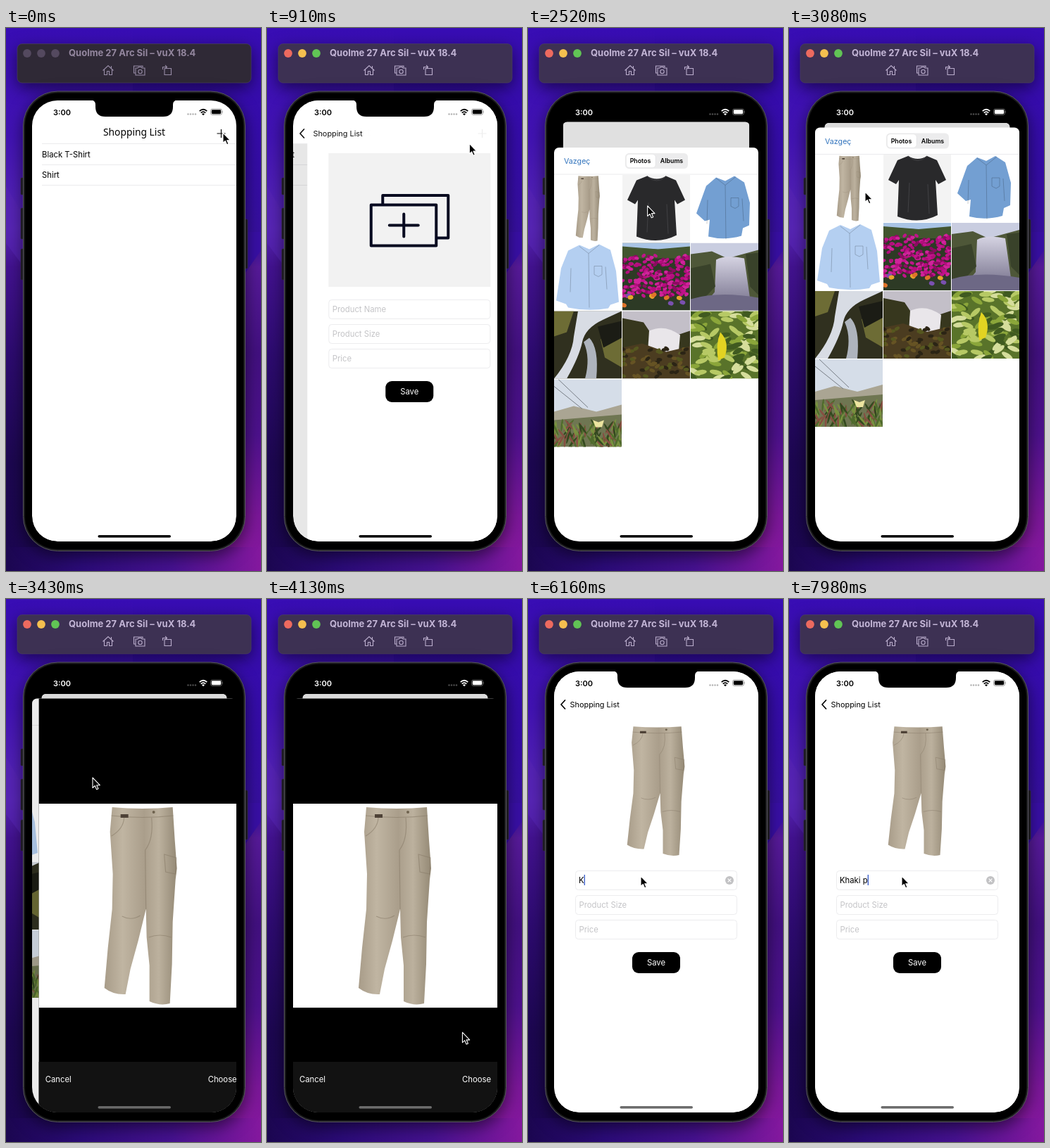
Recreate the animation shown at these times as an HTML page. Size 362x772 px, loop 8 s.

```html
<!DOCTYPE html>
<html lang="en">
<head>
<meta charset="utf-8">
<title>Shopping list app</title>
<style>
  html, body { margin: 0; width: 100%; height: 100%; overflow: hidden; background: #2a0a80; }
  svg { display: block; width: 362px; height: 772px; font: 11.3px Inter, sans-serif; }
  text { white-space: pre; }
  .shadow { filter: drop-shadow(0 7px 11px #0008); }
  .hint { fill: #c4c4c7; }
  .field { fill: #fff; stroke: #ececee; }
  .line { stroke: #ebebed; }
  .icon { fill: none; stroke: #b9accb; stroke-width: 1.1; }
</style>
</head>
<body>
<svg viewBox="0 0 362 772">
  <defs>
    <linearGradient id="wallLeft" x2="0" y2="1">
      <stop stop-color="#380db4"/><stop offset=".2" stop-color="#4113b2"/>
      <stop offset=".37" stop-color="#5726b4"/><stop offset=".44" stop-color="#42128f"/>
      <stop offset=".6" stop-color="#2d0b70"/><stop offset=".8" stop-color="#1c0750"/>
      <stop offset="1" stop-color="#1b0650"/>
    </linearGradient>
    <linearGradient id="wallRight" x2="0" y2="1">
      <stop stop-color="#380db4"/><stop offset=".25" stop-color="#340ca5"/>
      <stop offset=".4" stop-color="#36109c"/><stop offset=".44" stop-color="#561a98"/>
      <stop offset=".6" stop-color="#421080"/><stop offset=".75" stop-color="#4d118c"/>
      <stop offset=".9" stop-color="#7b1798"/><stop offset="1" stop-color="#87189f"/>
    </linearGradient>
    <linearGradient id="wallBottom">
      <stop stop-color="#1b0650"/><stop offset=".3" stop-color="#2b0b78"/>
      <stop offset=".65" stop-color="#45118f"/><stop offset="1" stop-color="#84189e"/>
    </linearGradient>
    <linearGradient id="khaki">
      <stop stop-color="#a89c89"/><stop offset=".25" stop-color="#c0b5a2"/>
      <stop offset=".55" stop-color="#aa9e8b"/><stop offset=".75" stop-color="#bcb19e"/><stop offset="1" stop-color="#948975"/>
    </linearGradient>
    <linearGradient id="mist" x2="0" y2="1">
      <stop stop-color="#d5d3e2"/><stop offset="1" stop-color="#6f6a85"/>
    </linearGradient>
    <clipPath id="screenClip"><rect x="37" y="103" width="290" height="627" rx="36"/></clipPath>
    <clipPath id="pageArea"><path d="M37 103H327V694A36 36 0 0 1 291 730H73A36 36 0 0 1 37 694Z"/></clipPath>
    <clipPath id="pageClip"><rect id="pageShape" x="37" y="103" width="290" height="627"/></clipPath>
    <clipPath id="cellClip"><rect width="96" height="96"/></clipPath>

    <g id="pants">
      <path fill="url(#khaki)" d="M104 5 101 40 105 100 104 150 98 205 93 262Q106 272 123 271L130 235 141 195 152 150 153 190 157 230 157 281Q172 288 186 284L189 228 190 168 194 108 196 92 193 52 190 5Q147 9 104 5Z"/>
      <path fill="none" stroke="#85796688" stroke-width="1.2" d="M103 17Q147 22 191 17M160 20Q163 50 151 66L152 150M121 20Q120 36 103 46M178 72 195 77 194 100 180 97ZM118 160Q131 167 144 159M156 190Q172 184 188 190"/>
      <path fill="#4e4237" d="M116 15h11v5h-11z"/><circle cx="163" cy="12" r="2" fill="#6e624e"/>
    </g>
    <path id="shirtSeams" fill="none" stroke="#0003" d="M36 5 49 15 64 3M49 15 50 92M23 70 24 36M75 66 73 34M57 33h11v12l-5 3-6-3z"/>
  </defs>

  <rect width="362" height="772" fill="url(#wallLeft)"/>
  <rect x="180" width="182" height="772" fill="url(#wallRight)"/>
  <path fill="#5726b4" d="M0 225 24 265V338L0 306Z" opacity=".6"/>
  <path fill="#380fa4" d="M340 290h22v26l-22 32z"/>
  <rect y="738" width="362" height="34" fill="url(#wallBottom)"/>

  <g class="shadow">
    <rect id="bar" x="16" y="22.5" width="332" height="55.5" rx="7" stroke="#50455f" stroke-width=".6"/>
    <circle class="light" cx="30" cy="36" r="5.900"/>
    <circle class="light" cx="50" cy="36" r="5.900"/>
    <circle class="light" cx="70" cy="36" r="5.900"/>
    <text id="windowTitle" x="89" y="40" font-size="13" font-weight="700">Quolme 27 Arc Sil – vuX 18.4</text>
    <g id="tools" class="icon">
      <path d="M137.500 60.500 145 53.500 152.500 60.500M139.500 59V66.500H143.500V61.500H146.500V66.500H150.500V59M149.500 57V54"/>
      <path d="M184 64H181.500V54H194V56M184 57H187L188 55.500H192L193 57H197V67H184Z"/><circle cx="190.500" cy="62" r="2.700"/>
      <path d="M225 57.500H234.500V66.500H225ZM222.500 59V55.500H228M226 53 228.500 55.500 226 58"/>
    </g>
  </g>

  <g fill="#25222c" stroke="#3d3948" stroke-width=".6">
    <rect x="21" y="213" width="6" height="24" rx="1.500"/><rect x="21" y="256" width="6" height="44" rx="1.500"/>
    <rect x="21" y="314" width="6" height="44" rx="1.500"/><rect x="337" y="272" width="6" height="70" rx="1.500"/>
  </g>
  <rect class="shadow" x="24.500" y="90" width="315" height="653.500" rx="49" fill="#1b1b1d" stroke="#58575d"/>
  <rect x="27" y="92.500" width="310" height="648.500" rx="46.500"/>

  <g clip-path="url(#pageArea)">
    <g id="page"><g clip-path="url(#pageClip)">
      <rect x="37" y="103" width="290" height="627" fill="#fff"/>
      <g id="list">
        <path class="line" d="M51 164.500H327M51 194.500H327M51 223.500H327"/>
        <text x="51" y="184">Black T-Shirt</text>
        <text x="51" y="213">Shirt</text>
      </g>
      <rect id="listDim" x="37" y="165" width="290" height="565"/>
      <g id="detail">
        <rect x="37" y="103" width="290" height="627" fill="#fff"/>
        <g id="picker">
          <rect x="67" y="178" width="230" height="190" fill="#f2f2f2"/>
          <path fill="none" stroke="#070a20" stroke-width="4" stroke-linejoin="round" stroke-linecap="round" d="M144 250V238H237V298.500H221M127.500 251.500H220V309.500H127.500ZM153.500 280.500H194.500M174 264.500V296.500"/>
        </g>
        <use id="chosen" href="#pants" transform="translate(67 178) scale(.793 .655)"/>
        <rect class="field" x="67.500" y="386.500" width="229" height="27" rx="4"/>
        <rect class="field" x="67.500" y="421.500" width="229" height="27" rx="4"/>
        <rect class="field" x="67.500" y="456.500" width="229" height="27" rx="4"/>
        <text id="nameHint" class="hint" x="72.500" y="404">Product Name</text>
        <text class="hint" x="72.500" y="439">Product Size</text>
        <text class="hint" x="72.500" y="474">Price</text>
        <text id="typed" x="72" y="404"></text>
        <rect id="caret" y="392" width="1.300" height="15" fill="#3056c8"/>
        <g id="clear"><circle cx="286" cy="400" r="6" fill="#c2c2c4"/><path stroke="#fff" stroke-width="1.200" d="M283.700 397.700l4.600 4.600m0-4.600l-4.600 4.600"/></g>
        <rect x="148" y="502" width="68" height="30" rx="9"/>
        <text x="182" y="521" fill="#fff" text-anchor="middle">Save</text>
      </g>
      <g id="title">
        <text x="182" y="153" text-anchor="middle" style="font:500 13.800px 'Noto Sans',sans-serif">Shopping List</text>
      </g>
      <path id="plus" stroke="#000" stroke-width="1.200" d="M299.500 150H311.500M305.500 144V156"/>
      <g id="back"><text x="59.500" y="154" font-size="10.900">Shopping List</text></g>
      <path id="chevron" fill="none" stroke="#000" stroke-width="1.700" stroke-linecap="round" stroke-linejoin="round" d="M52.500 144 47 150 52.500 156"/>
      <rect id="pageDim" x="37" y="103" width="290" height="627"/>
    </g></g>
  </g>

  <g clip-path="url(#screenClip)">
    <g id="sheet">
      <rect x="37" y="141.500" width="290" height="620" rx="7" fill="#fff"/>
      <g id="library">
        <text x="51" y="164.500" font-size="10.700" fill="#3274bd">Vazgeç</text>
        <rect x="138" y="149.500" width="89" height="22" rx="5.500" fill="#ececed"/>
        <rect x="139.200" y="150.700" width="42" height="19.600" rx="4.800" fill="#fff" stroke="#dededf" stroke-width=".6"/>
        <g font-size="8.800" font-weight="600" text-anchor="middle"><text x="159.500" y="163.700">Photos</text><text x="204" y="163.700">Albums</text></g>
        <path class="line" d="M37 179.500H327"/>
        <g id="grid"></g>
      </g>
      <rect id="libraryDim" x="37" y="141.500" width="290" height="620" rx="7"/>
      <g id="preview">
        <rect x="37" y="141.500" width="290" height="620" rx="1"/>
        <rect x="37" y="291" width="290" height="290" fill="#fff"/>
        <use href="#pants" x="37" y="291"/>
        <rect x="37" y="658" width="290" height="100" fill="#121212"/>
        <g fill="#fff"><text x="46" y="686.500">Cancel</text><text x="277" y="686.500">Choose</text></g>
      </g>
    </g>

    <g id="status">
      <text x="67" y="123.500" font-size="11" font-weight="600">3:00</text>
      <g opacity=".3"><circle cx="258.500" cy="122.500" r="1.200"/><circle cx="262" cy="122.500" r="1.200"/><circle cx="265.500" cy="122.500" r="1.200"/><circle cx="269" cy="122.500" r="1.200"/></g>
      <path fill="none" stroke="currentColor" stroke-width="1.700" d="M274.700 118.200Q280 113.300 285.300 118.200M276.700 120.600Q280 117.600 283.300 120.600"/>
      <path d="M278 122.200Q280 120.500 282 122.200L280 124.200Z"/>
      <rect x="290.500" y="115" width="16" height="8.500" rx="2.500" fill="none" stroke="currentColor" stroke-width=".7" opacity=".5"/>
      <rect x="291.800" y="116.300" width="13.400" height="5.900" rx="1.400"/><path d="M307.500 117.700q1.400 1.500 0 3z" opacity=".5"/>
    </g>
    <rect id="home" x="130.500" y="721" width="103.500" height="3.400" rx="1.700"/>
  </g>
  <path d="M121 102.500Q127 103 127 109V112Q127 126 141 126H223Q237 126 237 112V109Q237 103 243 102.500Z"/>

  <path id="cursor" stroke="#fff" stroke-width="1.100" stroke-linejoin="round" d="M0 0V14.500L3.300 11.500 5.600 16.800 8 15.800 5.700 10.700H10.300Z"/>
</svg>
<script>
const LOOP = 8000;
const el = Object.fromEntries([...document.querySelectorAll('[id]')].map(n => [n.id, n]));
const lights = [...document.querySelectorAll('.light')];
const lightColors = ['#ed6a5f', '#f5bf4f', '#61c455'];

let seed = 7;
const random = () => (seed = seed * 16807 % 2147483647) / 2147483647;
const shape = (fill, d) => `<path fill="${fill}" d="${d}"/>`;
const backdrop = fill => shape(fill, 'M0 0H96V96H0Z');

// Random blobs between two heights, in colours taken in turn
function scatter(count, top, bottom, rx, ry, colors) {
  let out = '';
  for (let i = 0; i < count; i++) {
    const x = random() * 96, y = top + random() * (bottom - top), turn = random() * 90 - 45;
    out += `<ellipse rx="${rx}" ry="${ry}" fill="${colors[i % colors.length]}" transform="translate(${x.toFixed(1)} ${y.toFixed(1)}) rotate(${turn.toFixed()})"/>`;
  }
  return out;
}

const seams = '<use href="#shirtSeams"/>';
const photos = [
  '<use href="#pants" transform="scale(.331)"/>',
  backdrop('#f3f3f3') + shape('#29292b', 'M35 2Q49 10 62 2L76 8 89 36 78 42 74 36 77 86Q50 100 20 88L22 36 18 42 7 36 20 8Z') +
    '<path fill="none" stroke="#414144" d="M35 2Q49 15 62 2M37 40 35 82M63 42 65 84"/>',
  shape('#739fd2', 'M36 4 49 9 62 2 76 11 84 40 83 72 74 76 72 87Q48 94 25 88L27 64 20 66 8 55 22 16Z') + seams,
  shape('#b4cff1', 'M36 3 50 9 64 2 80 10 88 40 92 84 80 88 77 93Q48 98 20 92L17 87 3 82 10 36 20 11Z') + seams,
  backdrop('#2d3a25') + shape('#a9c4e4', 'M0 0H96V7L60 10 0 6Z') + shape('#42552f', 'M0 5 50 9 96 5V22H0Z') +
    scatter(230, 18, 76, 3.2, 2.2, ['#b40d7d', '#d0249b', '#8d0a62', '#c0148a']) + scatter(9, 74, 90, 4, 3, ['#e7a32c', '#e0742a', '#7a50b0']),
  backdrop('#c9cde0') + shape('#4e5738', 'M0 16 30 12 52 22 96 10V96H0Z') + shape('url(#mist)', 'M36 24Q50 16 76 22L84 78 96 96H12L34 70Z') +
    shape('#39422a', 'M0 36 28 30 35 62 18 80 0 84ZM78 16 96 14V74L84 62Z') + shape('#6d6885', 'M0 80Q40 68 96 78V96H0Z'),
  backdrop('#30301f') + shape('#6d6c35', 'M0 0H28L18 30 0 36ZM66 40 96 30V80L72 66Z') + shape('#d8dce4', 'M34 0H96L70 12Q44 24 40 44T18 96H0Q26 64 28 36Z') +
    shape('#aeb4bd', 'M50 38Q64 52 60 96H44Q52 66 42 44Z') + shape('#1b1c15', 'M62 22 96 14V38L70 52Z'),
  backdrop('#c3bfc8') + shape('#37371e', 'M0 10 30 16 42 34 40 60H0ZM78 34 96 28V60H76Z') + shape('#e9e6ea', 'M38 28Q60 18 82 34L80 56 36 58Z') +
    shape('#4b3c20', 'M0 52 28 46 62 58 96 50V96H0Z') + scatter(60, 52, 94, 4, 2.4, ['#55571f', '#2b2415', '#665324']),
  backdrop('#59732a') + scatter(90, 0, 96, 9, 3.5, ['#8ba63a', '#b7c965', '#405a20', '#d5dd9b']) + shape('#e2d322', 'M42 30Q56 44 48 66L39 70Q35 48 42 30Z'),
  backdrop('#d5dde8') + shape('#aaa593', 'M0 46 28 38 60 46 96 36V96H0Z') + shape('#6f7652', 'M0 58 96 50V96H0Z') +
    scatter(100, 64, 96, 1.4, 9, ['#4f6b2c', '#79923f', '#34491f', '#874f42']) + '<path stroke="#777d85" d="M0 10 40 42M6 0 48 40"/>' +
    shape('#ece5a0', 'M55 58 63 61 71 58 68 68H59Z')
];
el.grid.innerHTML = photos.map((photo, i) =>
  `<g transform="translate(${37 + i % 3 * 97} ${180 + Math.floor(i / 3) * 97})" clip-path="url(#cellClip)">${photo}</g>`).join('');

const spring = ms => ms <= 0 ? 0 : 1 - (1 + ms * .016) * Math.exp(-ms * .016);

// time, x, y of the pointer
const pointer = [
  [0, 308, 149], [770, 308, 149], [1260, 205, 226], [1540, 173, 250], [1750, 170, 253], [2500, 170, 253],
  [3010, 108, 233], [3130, 108, 233], [3430, 123, 254], [3880, 215, 470], [4270, 303, 676], [4400, 303, 676],
  [4550, 216, 565], [4980, 164, 412], [5460, 160, 394]
];
function pointerAt(t) {
  const next = pointer.findIndex(k => k[0] > t);
  if (next < 0) return pointer[pointer.length - 1].slice(1);
  const [t0, x0, y0] = pointer[next - 1], [t1, x1, y1] = pointer[next];
  const u = (t - t0) / (t1 - t0), e = u * u * (3 - 2 * u);
  return [x0 + (x1 - x0) * e, y0 + (y1 - y0) * e];
}

const keyTimes = [6160, 6440, 6650, 6720, 6930, 7140, 7700];
const move = (node, x, y = 0) => node.setAttribute('transform', `translate(${x} ${y})`);
const fade = (node, opacity) => node.setAttribute('opacity', opacity);
const gray = v => `rgb(${v},${v},${v})`;

function draw(t) {
  const active = t >= 350;
  el.bar.setAttribute('fill', active ? '#3d3153' : '#2f2936');
  el.windowTitle.setAttribute('fill', active ? '#c3b5d6' : '#94879f');
  fade(el.tools, active ? 1 : .75);
  lights.forEach((light, i) => light.setAttribute('fill', active ? lightColors[i] : '#54495f'));

  const push = spring(t - 640);
  move(el.list, -87 * push);
  fade(el.listDim, .1 * push);
  move(el.detail, 290 * (1 - push));
  move(el.title, -85 * push);
  fade(el.title, (1 - push) ** 2);
  fade(el.plus, 1 - push);
  move(el.back, 85 * (1 - push));
  fade(el.back, push);
  fade(el.chevron, push);

  // The page loses its screen corners as soon as it shrinks behind the sheet
  const lift = spring(t - 2222) - spring(t - 4378);
  const scale = 1 - .093 * lift;
  el.page.setAttribute('transform', `translate(${182 - 182 * scale} ${103 + 32 * lift - 103 * scale}) scale(${scale})`);
  el.pageShape.setAttribute('rx', 36 * Math.max(0, 1 - 5 * lift) + 7 * lift ** 2);
  fade(el.pageDim, .14 * lift ** 3);
  move(el.sheet, 0, 589 * (1 - lift));
  const tone = gray(255 * (1 - (1 - lift) ** 3));
  el.status.setAttribute('fill', tone);
  el.status.setAttribute('color', tone);

  const zoom = spring(t - 3104);
  move(el.library, -87 * zoom);
  fade(el.libraryDim, .08 * zoom);
  move(el.preview, 290 * (1 - zoom));
  el.home.setAttribute('fill', gray(108 * zoom));

  const picked = t > 4000;
  fade(el.picker, picked ? 0 : 1);
  fade(el.chosen, picked ? 1 : 0);

  const typed = 'Khaki p'.slice(0, keyTimes.filter(k => t >= k).length);
  el.typed.textContent = typed;
  fade(el.nameHint, typed ? 0 : 1);
  fade(el.clear, typed ? 1 : 0);
  el.caret.setAttribute('x', 72 + (typed ? el.typed.getComputedTextLength() : 0));
  fade(el.caret, t < 5600 ? 0 : typed ? 1 : Math.min(1, Math.max(0, (6090 - t) / 210)));

  move(el.cursor, ...pointerAt(t));
}

function tick() {
  draw(performance.now() % LOOP);
  requestAnimationFrame(tick);
}
tick();
</script>
</body>
</html>
```
